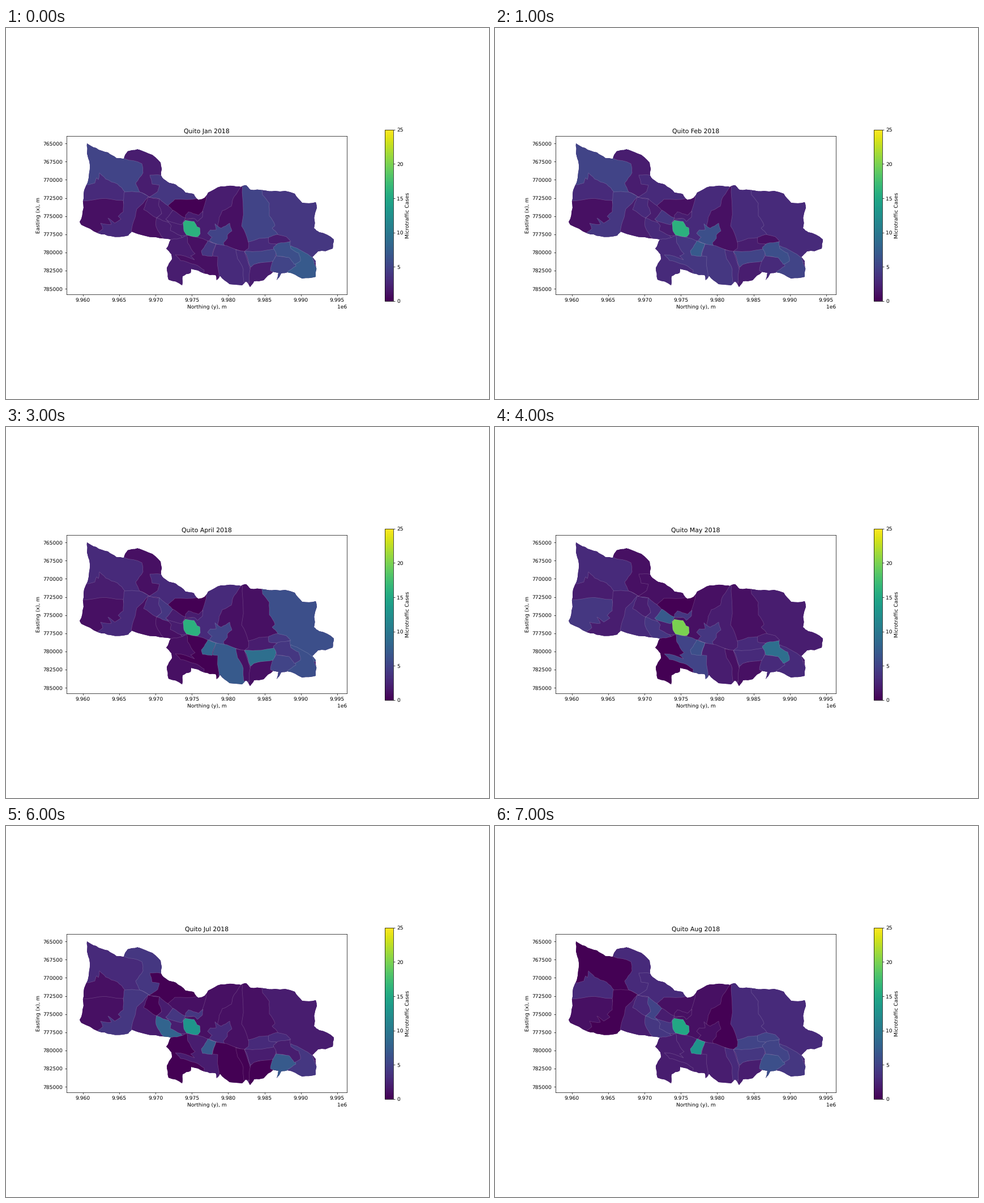
Write a matplotlib script that moves like this. It is 853 px wide and 656 px high and loops after 8000 ms.

```python
import numpy as np
import matplotlib.pyplot as plt
from matplotlib.animation import FuncAnimation
from matplotlib.patches import Polygon

W, H, DPI = 853, 656, 64
MONTHS = ["Jan", "Feb", "Mar", "April", "May", "Jun", "Jul", "Aug"]
COUNTED = [0, 2, 3, 4, 6, 7]  # the other months are interpolated
LEFT, RIGHT, TOP, BOTTOM = 106.7, 602.4, 191.2, 471.0

plt.rcParams.update({"font.family": "DejaVu Sans", "font.size": 10.25,
                     "text.hinting": "none"})
rng = np.random.default_rng(5)
fig = plt.figure(figsize=(W / DPI, H / DPI), dpi=DPI, facecolor="white")


def box(left, top, right, bottom):
    """Axes from a box in stage pixels, measured from the top left."""
    return fig.add_axes([left / W, 1 - bottom / H,
                         (right - left) / W, (bottom - top) / H])


def to_map(points):
    """Stage pixels to map metres."""
    p = np.reshape(points, (-1, 2))
    return np.column_stack([9.96e6 + (p[:, 0] - 135.8) * 5000 / 64.15,
                            765000 + (p[:, 1] - 204.2) * 2500 / 32.1])


def rough(points, amount):
    """Split every edge twice, pushing the midpoints sideways."""
    p = np.reshape(points, (-1, 2)).astype(float)
    for _ in range(2):
        step = np.roll(p, -1, axis=0) - p
        side = step[:, ::-1] * [-1, 1]
        push = rng.uniform(-amount, amount, (len(p), 1))
        p = np.stack([p, p + step / 2 + side * push], axis=1).reshape(-1, 2)
    return p


ax = box(LEFT, TOP, RIGHT, BOTTOM)
corners = to_map([LEFT, TOP, RIGHT, BOTTOM])
ax.set_xlim(corners[:, 0])
ax.set_ylim(corners[::-1, 1])
ax.set_xlabel("Northing (y), m")
ax.set_ylabel("Easting (x), m")
title = ax.set_title("")

scale = plt.cm.ScalarMappable(plt.Normalize(0, 25), "viridis")
fig.colorbar(scale, cax=box(668.6, 179.8, 683.9, 482.8),
             label="Microtraffic Cases")

# Key points of the city limits, clockwise from the north-west corner
upper = [
    143, 204, 159, 212, 180, 220, 195, 230, 208, 231, 215, 218, 232, 214.5,
    252, 222, 273, 238, 274, 261, 285, 272, 300, 277, 317, 291, 332, 294,
    340, 304, 351, 300, 357, 291, 380, 280, 400, 279, 415, 281, 424, 278,
    432, 286, 455, 287, 475, 288, 510, 293, 523, 309, 547, 308, 549, 318,
    544, 354, 553, 361, 579, 374, 577, 390, 551, 395, 541, 405, 547, 412]
lower = [
    547, 440, 523, 443, 497, 432, 486, 434, 478, 446, 481, 433, 472, 431,
    455, 446, 438, 448, 431, 458, 424, 448, 417, 455, 395, 453, 378, 438,
    372, 446, 370, 437, 350, 434, 327, 426, 326, 433, 312, 439, 311, 455,
    287, 445, 284, 424, 293, 409, 292, 400, 283, 390, 291, 374, 265, 370,
    222, 360, 216, 367, 185, 368, 163, 363, 133, 348, 130, 343, 137, 318,
    137, 295, 146, 265, 147, 235, 143, 222]
city = ax.add_patch(Polygon(to_map(rough(upper + lower, 0.08)),
                            fc="#482071", lw=0))
districts = []


def district(counts, *points):
    """Add a district over the earlier ones, trimmed to the city limits."""
    patch = Polygon(to_map(rough(points, 0.06)), ec=(1, 1, 1, 0.2), lw=0.8)
    ax.add_patch(patch)
    patch.set_clip_path(city)
    cases = np.interp(range(len(MONTHS)), COUNTED, counts)
    districts.append((patch, np.ceil(cases)))


# South-west
district((5, 4, 3, 3, 3, 0), 120, 190, 250, 190, 250, 300, 120, 300)
district((2, 1, 1, 1, 4, 3), 209, 231, 240, 240, 242, 256, 229, 274,
         236, 290, 253, 299, 290, 290, 290, 205, 205, 205)
district((4, 1, 3, 1, 0, 3), 280, 260, 254, 260, 258, 276, 271, 278,
         268, 289, 253, 299, 286, 316, 342, 308, 345, 280)
district((3, 2, 2, 2, 1, 3), 120, 278, 147, 277, 157, 274, 160, 265,
         163, 268, 165, 256, 176, 267, 197, 276, 210, 290, 210, 320, 120, 320)
district((1, 1, 1, 4, 1, 1), 120, 304, 165, 302, 207, 305, 215, 340,
         170, 370, 120, 370)
district((3, 5, 3, 2, 4, 0), 209, 290, 236, 290, 253, 299, 225, 380,
         160, 380, 162, 362, 171, 355, 167, 345, 186, 347, 180, 336,
         192, 345, 203, 338, 198, 333, 207, 325, 207, 305)
district((1, 2, 1, 3, 2, 2), 251, 299, 231, 320, 228, 335, 221, 361,
         225, 380, 290, 385, 280, 330, 270, 302)
district((2, 3, 3, 2, 0, 3), 251, 299, 271, 302, 275, 328, 266, 336,
         243, 321)

# Centre west
district((2, 3, 1, 4, 8, 4), 266, 335, 292, 338, 312, 372, 285, 382,
         271, 362, 265, 351)
district((2, 2, 4, 3, 2, 5), 271, 302, 286, 314, 296, 321, 288, 344,
         266, 336, 275, 328, 270, 315)
district((2, 2, 2, 2, 2, 4), 283, 338, 318, 342, 322, 368, 308, 367,
         290, 358, 292, 350)
district((0, 1, 0, 0, 1, 1), 286, 314, 298, 303, 340, 301, 358, 295,
         350, 335, 320, 342, 294, 322)
district((2, 6, 2, 7, 4, 2), 282, 338, 295, 322, 317, 336, 310, 348,
         288, 342)
district((2, 3, 1, 0, 0, 2), 270, 385, 291, 374, 302, 373, 321, 366,
         345, 385, 355, 437, 340, 460, 270, 460)
district((2, 3, 3, 1, 1, 1), 352, 270, 350, 315, 340, 335, 317, 339,
         320, 366, 357, 377, 390, 390, 430, 390, 425, 270)
district((2, 1, 2, 4, 4, 1), 317, 331, 322, 325, 340, 331, 348, 324,
         347, 334, 338, 342, 333, 337, 317, 337)
district((16, 15, 16, 20, 13, 15), 313, 344, 317, 340, 332, 342, 337, 351,
         342, 353, 343, 364, 339, 369, 319, 366, 314, 358)

# North
district((1, 0, 1, 2, 1, 0), 416, 280, 403, 298, 398, 315, 382, 323,
         374, 348, 375, 375, 386, 387, 430, 397, 430, 280)
district((5, 0, 1, 1, 1, 3), 418, 270, 416, 350, 428, 379, 485, 380,
         480, 300, 450, 270)
district((4, 1, 6, 2, 2, 3), 451, 275, 453, 295, 465, 310, 465, 332,
         475, 349, 470, 354, 480, 365, 485, 385, 545, 415, 600, 400, 600, 275)
district((3, 0, 2, 3, 3, 5), 428, 378, 447, 372, 464, 371, 480, 385,
         475, 395, 421, 395, 428, 390)
district((2, 0, 4, 2, 3, 5), 464, 370, 479, 365, 495, 369, 503, 377,
         478, 382, 464, 380)
district((5, 7, 5, 4, 3, 1), 356, 363, 361, 357, 371, 357, 369, 346,
         380, 354, 395, 345, 399, 359, 391, 366, 391, 372, 384, 380,
         386, 388, 359, 376, 364, 370)

# Centre east
district((1, 6, 0, 5, 2, 2), 319, 366, 357, 377, 380, 386, 385, 450,
         349, 450, 350, 428, 333, 418, 308, 411, 299, 401, 333, 410,
         326, 403, 334, 399, 321, 380)
district((4, 10, 8, 6, 7, 13), 357, 376, 371, 382, 364, 404, 347, 402,
         345, 394, 350, 388)
district((3, 5, 7, 2, 0, 2), 371, 382, 407, 392, 425, 420, 425, 465,
         376, 465, 374, 404, 365, 403)
district((3, 3, 1, 1, 0, 3), 406, 392, 421, 395, 436, 450, 420, 449,
         419, 427, 409, 408)

# North-east
district((2, 1, 1, 1, 0, 2), 432, 423, 438, 417, 470, 410, 480, 430,
         460, 465, 425, 465, 430, 449)
district((5, 4, 9, 3, 2, 4), 421, 395, 440, 395, 480, 388, 474, 412,
         438, 418, 432, 423)
district((7, 3, 6, 3, 4, 4), 503, 385, 524, 395, 541, 406, 560, 450,
         495, 450, 500, 410)
district((5, 0, 5, 3, 7, 6), 478, 402, 505, 405, 512, 421, 497, 431,
         488, 450, 472, 450, 480, 436, 467, 429, 470, 415)
district((6, 6, 4, 9, 2, 5), 472, 388, 480, 381, 502, 378, 503, 390,
         517, 398, 520, 412, 509, 418, 500, 406, 478, 403)


def show_month(i):
    for patch, cases in districts:
        patch.set_facecolor(scale.to_rgba(cases[i]))
    title.set_text(f"Quito {MONTHS[i]} 2018")
    return [title, *(patch for patch, _ in districts)]


anim = FuncAnimation(fig, show_month, frames=len(MONTHS), interval=1000,
                     init_func=lambda: show_month(0), repeat=True)
plt.show()
```
